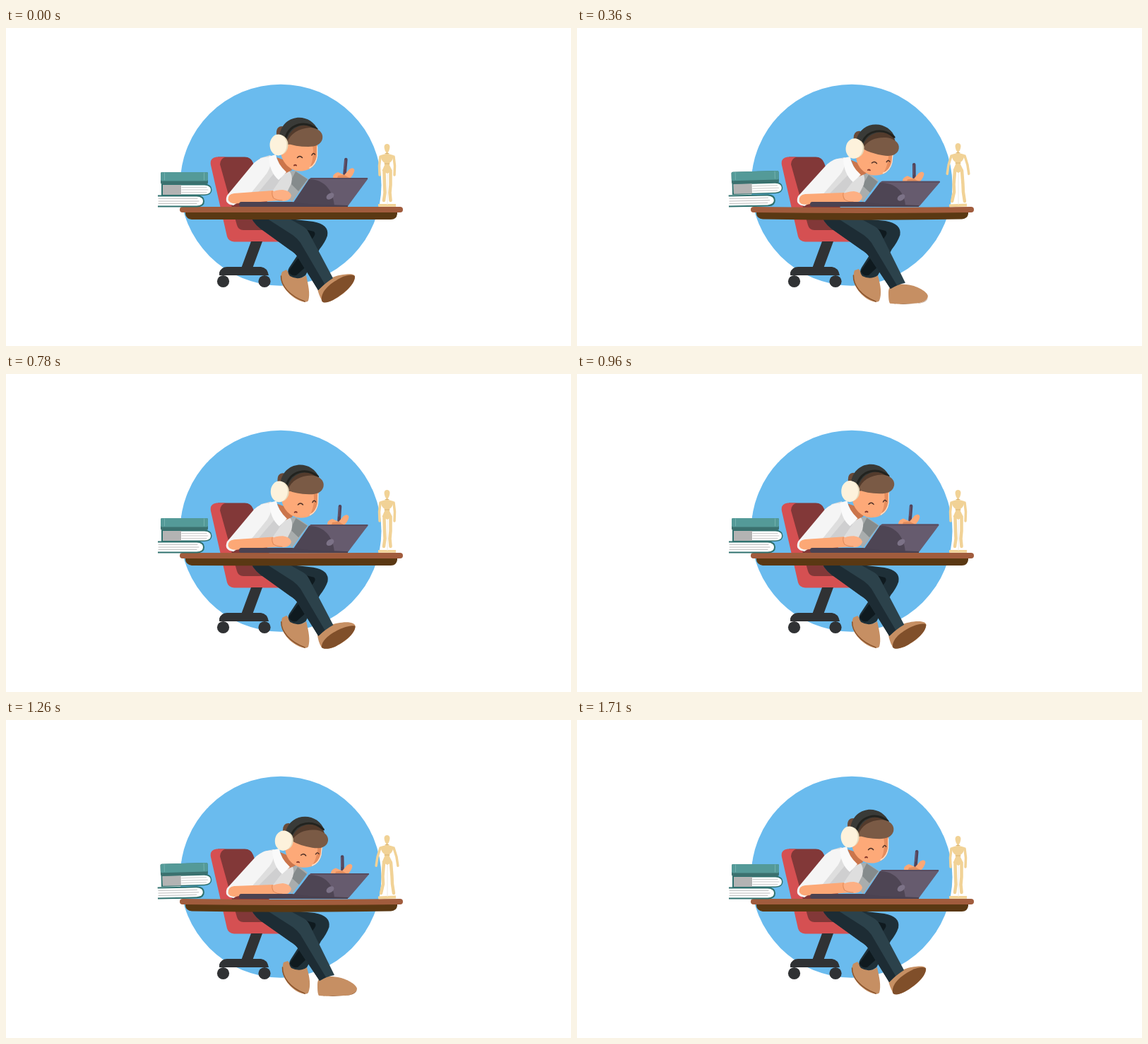
An HTML page that plays this animation: 800x450 px, repeating every 1.74 s.

```html
<!DOCTYPE html>
<html lang="en">
<head>
<meta charset="utf-8">
<title>Drawing at the desk</title>
<style>
html, body { margin: 0; width: 100%; height: 100%; overflow: hidden; background: #fff; }
svg { display: block; width: 100vw; height: 100vh; }
</style>
</head>
<body>
<svg viewBox="0 0 800 450" fill="none" stroke-linecap="round" stroke-linejoin="round">
  <circle cx="389" cy="222.200" r="142.500" fill="#6abbee"/>

  <g id="chair">
    <path fill="#823838" d="M300 182.500H338Q347 182.500 350 191L385 288H320Z"/>
    <path fill="#d55052" d="M290 194Q288 184 298 182.500H311Q303 185 303 193L327 279Q329 286 336 286H388V302.500H323Q315 302 313 295Z"/>
    <path fill="#303234" d="M347 302H363L349 340H333ZM302 350V346Q305 338 313 338H361Q370 339 372 350Z"/>
    <circle cx="307.500" cy="358.500" r="8.600" fill="#303234"/>
    <circle cx="366" cy="358.500" r="8.600" fill="#303234"/>
  </g>

  <path id="farShoe" fill="#c68f63"/>
  <path id="farSole" stroke="#8a552e" stroke-width="1.500"/>
  <path id="farLeg" fill="#1f3038"/>
  <path id="farShade" fill="#0f1a1f"/>
  <path id="shoe" fill="#c68f63"/>
  <path id="sole" fill="#804f2a"/>
  <path id="nearLeg" fill="#2c424b"/>
  <path id="nearShade" fill="#1d2c34"/>

  <path id="farSleeve" fill="#a9adad"/>
  <path id="farSleeveShade" fill="#858b8c"/>
  <path id="torso" fill="#dedede"/>
  <path id="back" fill="#cfcfd0"/>
  <path id="sleeve" fill="#f5f5f5"/>
  <path id="neck" fill="#cb754b"/>
  <path id="collar" fill="#fafafa"/>

  <g id="head">
    <path fill="#6a4b39" d="M383 151Q382 139 391 139L402 146L393 162Z"/>
    <path fill="#fda978" d="M391 158H441V181C440 196 428 202.500 416 202.500C402 202 391 191 389 176Z"/>
    <path stroke="#fde3cf" stroke-width="1.500" d="M440.500 168V181Q439 193 430 198"/>
    <path fill="#e68d5d" d="M434 165H440V181Q438 192 431 196Q437 182 434 165Z"/>
    <path fill="#533b2c" d="M394 165Q395 135 418 133Q435 133 442 148L430 160L398 165Z"/>
    <path fill="#393a37" d="M387 153C391 121 431 118 442 145C428 131 404 137 398 158Z"/>
    <path stroke="#22231f" stroke-width="3" d="M396 155C402 136 423 130 440 143"/>
    <g id="features" stroke="#4b2e25" stroke-width="1.500">
      <path d="M412.500 183.500Q416 179.500 419.500 183.500M433 180Q435 175.500 437.500 179"/>
      <path d="M408 194.500Q409.500 193 411 194.500" stroke="#8b3c2c" stroke-width="2"/>
    </g>
    <path id="fringe" fill="#7a5a45" d="M398 163C402 149 415 142 430 141C443 141 450 149 448 157C446 165 438 168 428 168Q409 168 398 163Z"/>
    <ellipse cx="388" cy="165.500" rx="11.500" ry="14" fill="#e7d9ba"/>
    <ellipse cx="385.500" cy="165.500" rx="12" ry="15" fill="#fdf2dc"/>
  </g>

  <path id="forearm" fill="#fca876"/>
  <path id="hand" fill="#fdb084"/>
  <path id="handLine" stroke="#e28d5d" stroke-width="1.200"/>

  <g id="drawingHand">
    <g id="pen">
      <path stroke="#52445a" stroke-width="4.600" d="M479.500 186V207"/>
      <path stroke="#6b5c74" stroke-width="1.200" d="M478.500 187V200"/>
    </g>
    <path fill="#fca876" d="M463 214Q462 206 470 204L479 208L486 200Q492 196 493.500 201Q493 207 485 215Z"/>
    <path fill="#e28d5d" d="M470 209L479 208L486 212L480 215H468Z"/>
  </g>

  <path id="screen" fill="#665b6e"/>
  <path id="screenDark" fill="#4e4554"/>
  <path id="screenRim" stroke="#584d60" stroke-width="2"/>
  <ellipse id="badge" cx="459" cy="238" rx="6" ry="4" fill="#7c7287"/>
  <path fill="#4b4251" d="M333 246H405L430 249L484 251V253H333Q330 253 330 249.500Q330 246 333 246Z"/>

  <path id="under" fill="#5a3813"/>
  <path id="top" stroke="#a15c3d" stroke-width="8"/>

  <g id="bookLow">
    <path fill="#2f716e" d="M215 236.500H271Q281 237 281 245Q281 253 271 253.500H215Z"/>
    <path fill="#fff" d="M214 238.500H270Q279 239 279 245Q279 251 270 251.500H214Z"/>
    <path stroke="#bdbdbd" d="M216 241.500H271M216 245H273M216 248.500H270"/>
  </g>
  <g id="bookMid">
    <path fill="#2f716e" d="M220 220.500H281Q291.500 221 291.500 229Q291.500 236.500 281 237H220Z"/>
    <path fill="#fff" d="M222 222.500H281Q290 223 290 229Q290 235 281 235.500H222Z"/>
    <path stroke="#c9c9c9" d="M249 225.500H284M249 229H286M249 232.500H284"/>
    <path fill="#b3b3b3" d="M222 222H248V236H222Z"/>
  </g>
  <g id="bookTop">
    <rect x="219" y="204" width="67" height="17" rx="2" fill="#3b716f"/>
    <rect x="219" y="204" width="67" height="12.500" rx="2" fill="#549a98"/>
    <path stroke="#73b1ae" d="M224.500 205V215M280.500 205V215"/>
  </g>

  <g id="figure" fill="#f1d296" stroke="#f1d296">
    <path id="stand" stroke="none" d="M527 249H552V252.800H527Z"/>
    <path stroke="#f4f1ea" stroke-width="1.500" d="M540 203V249"/>
    <g id="doll">
      <path stroke="none" d="M535.500 168Q536 164 539.500 164Q543 164 543.500 168Q543 175 539.500 176.500Q536 175 535.500 168Z"/>
      <path stroke="none" d="M538 175H541V178L548.500 180Q548 188 543 191V194L547 202L540 206L532.500 202L536 194V191Q531 188 530.500 180L538 178Z"/>
      <path id="leftArm" stroke-width="3.500" d="M530 182L528.500 195L529 208"/>
      <path id="rightArm" stroke-width="3.500" d="M549 182L550.500 195L550 208"/>
      <path id="legs" stroke-width="4.500"/>
      <path stroke="#d4ad6c" stroke-width=".8" d="M536 192H543M537 177.500H542"/>
    </g>
  </g>
</svg>
<script>
const LOOP = 1740;
const el = id => document.getElementById(id);
const lerp = (a, b, k) => a + (b - a) * k;

// Blend two paths that share the same commands.
function mix(from, to, k) {
  const goal = to.match(/-?[\d.]+/g);
  let i = 0;
  return from.replace(/-?[\d.]+/g, n => lerp(+n, +goal[i++], k).toFixed(2));
}

// Cosine easing through [time, value] keys.
function ease(keys, t) {
  let i = 1;
  while (i < keys.length - 1 && t > keys[i][0]) i++;
  const [t0, a] = keys[i - 1], [t1, b] = keys[i];
  return lerp(a, b, (1 - Math.cos(Math.PI * (t - t0) / (t1 - t0))) / 2);
}

// Upright and leaning shapes.
const poses = {
  farLeg: ["M385 268L435 274Q458 278 455 294Q452 303 444 313L424 350Q414 358 402 351Q397 345 401 339L425 303L395 285Z",
           "M385 268L437 273Q460 277 457.500 293Q454 303 446 313L426 350Q416 357 404 351Q399 345 403 339L426 303L395 285Z"],
  farShade: ["M411 282L436 288Q439 291 436 295L429 305ZM419 318L429 334L411 350Q403 352 400 344Z",
             "M413 281L437 287Q440 290 437 294L430 304ZM420 318L430 334L413 350Q405 352 402 344Z"],
  nearLeg: ["M347 268H398L421 281Q426 284 429 290L463 354Q453 360 442 371L413 324Q409 318 402 314L366 288Q353 280 347 268Z",
            "M347 268H398L422 281Q427 284 430 290L465 361Q454 363 444 369L414 324Q410 318 403 314L366 288Q353 280 347 268Z"],
  nearShade: ["M347 268H367L406 293Q413 298 417 304L451 362L442 371L413 324Q409 318 402 314L366 288Q353 280 347 268Z",
              "M347 268H367L406 293Q413 298 417 304L453 364L444 369L414 324Q410 318 403 314L366 288Q353 280 347 268Z"],
  farShoe: ["M391 345C385 358 396 376 414 385Q425 390 428 386C431 376 428 364 425 350Q409 361 397 342Z",
            "M393 343C388 358 397 376 414 385Q425 390 428 386C432 376 430 364 426 350Q411 359 399 341Z"],
  farSole: ["M389.500 351C389 364 401 379 423 387", "M391.500 350C391 364 402 379 423 387"],
  shoe: ["M441 369C445 360 462 351 477 349C490 347 495 349 494 353C492 366 475 379 463 385C455 389 449 389 447 385C444 380 442 374 441 369Z",
         "M441 374C441 361 453 362 470 364C482 366 496 374 497 380C497 387 488 390 478 390C465 391 450 391 443 390C441 387 441 380 441 374Z"],
  farSleeve: ["M399 203L410 202L428 214L405 246L390 232Z", "M403 207L414 206L427 216L405 246L392 234Z"],
  farSleeveShade: ["M410 203L427 214L414 231L402 219Z", "M413 208L426 218L415 233L404 223Z"],
  torso: ["M360 184L374 180L400 201Q407 208 404 220L396 236H340Z", "M365 186L379 183L405 206Q409 212 406 222L398 238H340Z"],
  back: ["M381 204L390 212L375 234H356Z", "M385 207L393 214L376 236H356Z"],
  sleeve: ["M351 191Q362 181 373 183Q378 192 369 206L345 236L322 251Q308 249 313 237Z",
           "M354 193Q366 183 377 185Q383 193 373 207L346 238L322 252Q308 250 313 238Z"],
  neck: ["M383 183L401 189L405 201L393 207Z", "M388 187L407 195L410 206L398 211Z"],
  collar: ["M372 182L382 179Q384 192 397 204L386 215Q373 204 372 182Z", "M377 184L387 182Q388 195 402 208L391 218Q378 207 377 184Z"],
  forearm: ["M323 234L378 230L390 244L330 248Q317 250 314.500 243Q314 235 323 234Z",
            "M323 235L378 233L390 246L330 249Q317 252 314.500 245Q314 236 323 235Z"],
  hand: ["M376 233Q381 229 392 229Q402 230 404 237Q403 244 393 245L379 243Z",
         "M376 235Q381 232 392 231Q402 232 404 239Q403 246 393 247L379 245Z"],
  handLine: ["M377 231Q376 236 379 241Q384 244 391 244", "M377 234Q376 238 379 243Q384 246 391 246"],
  screen: ["M404 251L429 214Q430.500 212 433 212H511Q513 212 512 214L484 252Z",
           "M404 251L429 219Q430.500 217 433 217H513Q515 217 513.500 219L485 252Z"],
  screenDark: ["M404 252L429 214C451 214 463 230 465 252Z", "M404 252L429 219C452 219 464 233 465 252Z"],
  screenRim: ["M432 213H511", "M432 218H513"],
  under: ["M254 259Q404 259 554 259V263Q553 271 545 271Q404 271 263 271Q255 270 254 263Z",
          "M254 259Q404 261 554 259V263Q553 270 545 270.500Q404 273 263 270.500Q255 270 254 263Z"],
  top: ["M250 257Q404 257 558 257", "M250 257Q404 259 558 257"]
};
const soleUp = "M447 386C445 373 458 362 473 354C485 348 494 349 494 352C494 364 475 378 463 385C455 389 449 390 447 386Z";
const soleFlat = "M446 390C455 390 468 390 478 390C488 390 497 386 497 380C497 387 488 390 478 390C465 391 450 390 446 390Z";
const legsStill = "M535.5 203L536 222L536.5 233L535 244M544.5 203L544.5 222L543.5 233L544.5 244";
const legsHop = "M535 203L533.5 222L534 233L531 246M545 203L546.5 222L547 233L549 246";

const leanKeys = [[0, 0], [410, 1], [520, 1], [880, 0], [1270, 1], [1340, 1], [LOOP, 0]];
const strokeKeys = [[0, 0], [360, -2], [600, -8], [960, -8], [1260, -3], [1470, -3], [LOOP, 0]];

function draw(t) {
  const lean = ease(leanKeys, t);
  const away = Math.abs(t % 870 - 380);
  const hop = away < 190 ? Math.cos(away / 190 * Math.PI / 2) ** 2 : 0;
  const move = (id, value) => el(id).setAttribute("transform", value);

  for (const id in poses) el(id).setAttribute("d", mix(...poses[id], lean));
  el("sole").setAttribute("d", mix(soleUp, soleFlat, Math.min(1, lean / .96)));

  move("head", `translate(${415 + 7 * lean} ${167 + 8 * lean}) scale(1 ${1 - .05 * lean}) rotate(${6 * lean}) translate(-415 -167)`);
  move("fringe", `translate(0 ${3.5 * lean}) rotate(${4 * lean} 423 156)`);
  move("features", `translate(0 ${lean})`);
  move("drawingHand", `translate(${ease(strokeKeys, t)} ${5.500 * lean})`);
  move("pen", `translate(0 ${2 * lean}) rotate(${5 - 6 * lean} 479 207)`);
  move("badge", `translate(0 ${2 * lean}) rotate(-35 459 238)`);

  move("bookLow", `rotate(${-1.2 * hop} 215 253)`);
  move("bookMid", `translate(0 ${-1.2 * hop}) rotate(${-1.5 * hop} 223 237)`);
  move("bookTop", `translate(0 ${-.3 * hop}) rotate(${-1.6 * hop} 219 220)`);

  move("stand", `rotate(${-2 * hop} 540 251)`);
  move("doll", `translate(0 ${-hop})`);
  move("leftArm", `rotate(${11 * hop} 530 182)`);
  move("rightArm", `rotate(${-11 * hop} 549 182)`);
  el("legs").setAttribute("d", mix(legsStill, legsHop, hop));
}

const start = performance.now();
function tick(now) {
  draw(Math.max(0, now - start) % LOOP);
  requestAnimationFrame(tick);
}
draw(0);
requestAnimationFrame(tick);
</script>
</body>
</html>
```
